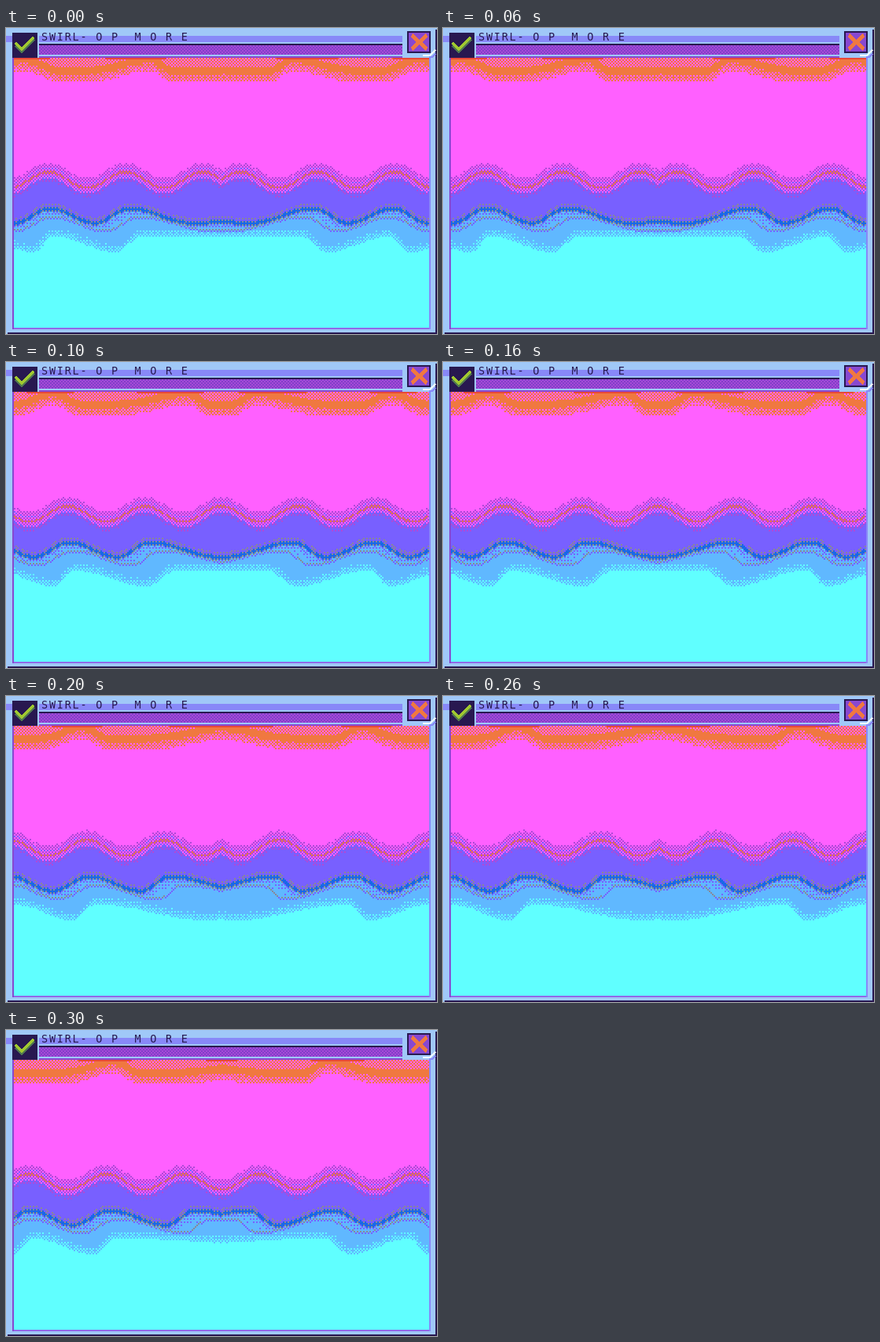
An HTML page with a canvas for the animation above (400 ms loop, 548 px wide and 390 px high).

```html
<!DOCTYPE html>
<html lang="en">
<head>
<meta charset="utf-8">
<title>Hypnotic window</title>
<style>
  html, body { margin: 0; width: 100%; height: 100%; overflow: hidden; background: #a0c8f8; }
  svg, canvas { position: absolute; display: block; }
  svg { left: 0; top: 0; }
  canvas { left: 10px; top: 38px; width: 528px; height: 344px; image-rendering: pixelated; }
  text { font: 13.5px "DejaVu Sans Mono", monospace; letter-spacing: 1.75px; white-space: pre; }
</style>
</head>
<body>
<svg width="548" height="390" viewBox="0 0 548 390" shape-rendering="crispEdges">
  <defs>
    <pattern id="weave" width="4" height="4" patternUnits="userSpaceOnUse">
      <path fill="#8040c8" d="M0 0h4v4h-4z"/>
      <path fill="#a848d8" d="M0 0h2v2h-2zM2 2h2v2h-2z"/>
    </pattern>
  </defs>
  <path fill="#a0c8f8" d="M0 0h548v390h-548z"/>
  <path fill="#8888f8" d="M0 10h8v8h-8zM42 10h462v8h-462zM538 38h2v346h-2z"/>
  <path fill="#8848d0" d="M8 38h2v346h-2zM42 36h462v2h-462z"/>
  <path fill="#9068e8" d="M10 382h528v2h-528z"/>
  <path fill="#281850" d="M546 2h2v388h-2zM2 388h546v2h-546zM42 20h462v2h-462z"/>
  <path fill="url(#weave)" d="M42 22h462v12h-462z"/>
  <path fill="#281850" d="M8 6h32v32h-32z"/>
  <g fill="none" stroke-width="5">
    <path stroke="#507850" d="M13 22l7 7l15-15"/>
    <path stroke="#a0c830" stroke-width="4" d="M12 19l8 8l15-15"/>
  </g>
  <path fill="#281850" d="M510 4h30v28h-30z"/>
  <path fill="#8848d0" d="M512 6h26v24h-26z"/>
  <path fill="none" stroke="#f07840" stroke-width="5" d="M516 9l19 18M535 9l-19 18"/>
  <path fill="none" stroke="#8888f8" stroke-width="2" d="M538 37h4l4-4"/>
  <path fill="none" stroke="#f0f8ff" stroke-width="2" d="M530 35h9l7-7"/>
  <text x="45" y="16" fill="#281850">SWIRL- O P  M O R E</text>
</svg>
<canvas id="field" width="264" height="172"></canvas>
<script>
const ctx = document.getElementById('field').getContext('2d');
const W = 264, H = 172, CELL = 2, LEFT = 10, TOP = 38, MID = 274;
const img = ctx.createImageData(W, H);

const rgb = hex => [1, 3, 5].map(i => parseInt(hex.slice(i, i + 2), 16));
const pink = rgb('#ff60ff'), violet = rgb('#7860ff'), sky = rgb('#60b8ff'),
      cyan = rgb('#60ffff'), orange = rgb('#f07840'), red = rgb('#e84838'),
      mauve = rgb('#b048d8'), blue = rgb('#1868e8'), gray = rgb('#888898');

const BAYER = [0, 8, 2, 10, 12, 4, 14, 6, 3, 11, 1, 9, 15, 7, 13, 5];
const ease = t => (1 - Math.cos(Math.PI * t)) / 2;

// 0 at a(k), 1 at the following b(k), back to 0 at a(k + 4)
function wave(x, k0, a, b, pow = 1) {
  for (let k = k0 - 4; k < k0 + 16; k += 4) {
    const p = a(k), q = b(k), r = a(k + 4);
    if (x >= p && x < q) return ease(((x - p) / (q - p)) ** pow);
    if (x >= q && x < r) return 1 - ease((x - q) / (r - q));
  }
  return 0;
}

// Crests and troughs drift to the middle and spread out as they get there.
const lineCrest = k => 6 + 24.5 * k + 0.1 * k * k + 6 * 30 ** (k - 9);
const lineTrough = k => 12 + 22.5 * k + 0.7 * k * k;
const shoreCrest = k => 10 + 25 * k + 0.25 * k * k + 20 * 6 ** (k - 7);
const shoreTrough = k => 35 + 25 * k + 18 * 4 ** (k - 5);
const flameDeep = k => 70 + 26 * k + (k > 0 ? 2.5 * k * k : 0);
const flameShallow = k => 22 + 34 * k + 1.5 * k * k;

const upper = (x, n) => ease((x - 54 - 24.5 * n) / 49);
const line = (x, n) => wave(x, (n + 2) % 4, lineCrest, k => lineTrough(k + 2));
const foam = (x, n) => wave(x, (n + 2) % 4,
  k => lineCrest(k) + 2 * k,
  k => lineTrough(k + 2) + 3.5 * (k + 2));
const shore = (x, n) => wave(x, (n + 2) % 4, shoreCrest, k => shoreTrough(k + 2));
const flame = (x, n) => 1 - wave(x, n, flameDeep, k => flameShallow(k + 4), 1.8);

function colour(y, e, th, odd) {
  const mix = (lo, hi, t) => t > th ? hi : lo;

  if (y < 90) {
    const end = 55 + 15 * e.flame, f = y - end;
    if (y < 41 && e.flame < 0.8) return red;
    if (f < -20) return mix(pink, orange, 0.5);
    if (f < -11) return orange;
    return f < 0 ? mix(pink, orange, 0.25 - f * 0.045) : pink;
  }

  const s = y - e.upper;
  if (s < 0) return pink;
  if (s < 6) return mix(pink, mauve, 0.35 + s * 0.03);
  if (s < 11) return odd ? pink : s < 8 ? violet : mauve;
  if (s < 14) return odd ? orange : mauve;
  if (s < 20) return odd ? pink : s < 17 ? mauve : violet;
  if (s < 25) return mix(violet, mauve, 0.5 - (s - 20) * 0.07);

  const d = y - e.line;
  if (d < -6) return violet;
  if (d < -4) return odd ? gray : violet;
  if (d < -2) return violet;
  if (d < 0) return odd ? gray : blue;
  if (d < 2) return blue;
  if (d < 4) return odd ? gray : blue;

  const g = y - e.foam;
  if (g < -2) return mix(violet, sky, 0.45 + d * 0.03);
  if (g < 0) return odd ? gray : sky;
  if (g < 2) return odd ? violet : sky;

  const c = y - e.shore;
  if (c < -8) return sky;
  return c < 3 ? mix(sky, cyan, 0.06 + (c + 8) * 0.05) : cyan;
}

function draw(n) {
  for (let i = 0; i < W; i++) {
    const x = MID - Math.abs(LEFT + CELL * i + 1 - MID);
    const e = {
      flame: flame(x, n),
      upper: 171 + 20 * upper(x, n),
      line: 229 + 18.5 * line(x, n),
      foam: 241 + 18 * foam(x, n),
      shore: 263 + 20 * shore(x, n)
    };
    for (let j = 0; j < H; j++) {
      const th = (BAYER[(j & 3) * 4 + (i & 3)] + 0.5) / 16;
      const c = colour(TOP + CELL * j + 1, e, th, (i + j) & 1);
      img.data.set([c[0], c[1], c[2], 255], (j * W + i) * 4);
    }
  }
  ctx.putImageData(img, 0, 0);
}

let shown = -1;
const start = performance.now();
function tick(now) {
  const n = Math.floor(Math.max(0, now - start) / 100) % 4;
  if (n !== shown) draw(shown = n);
  requestAnimationFrame(tick);
}
tick(start);
</script>
</body>
</html>
```
